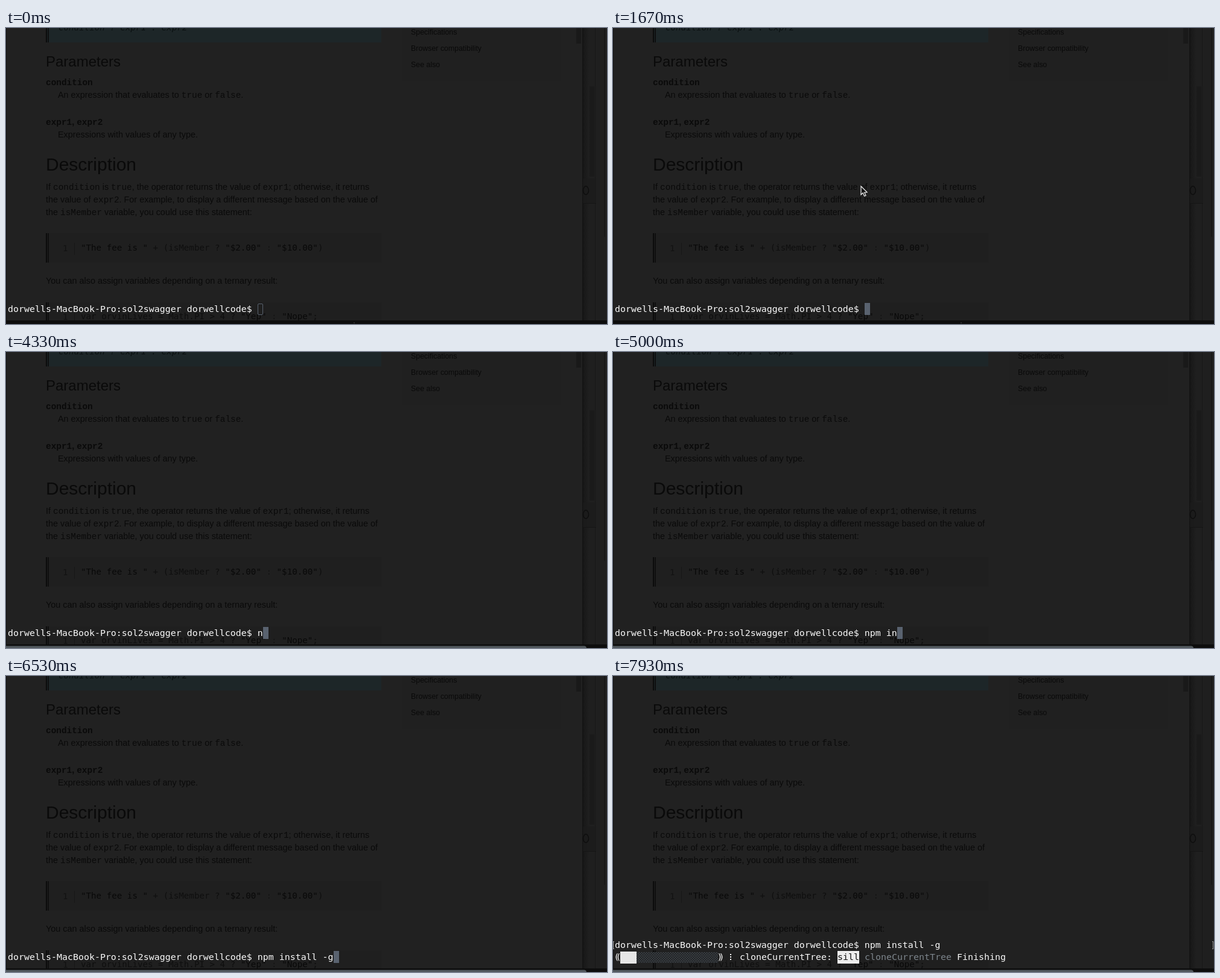
Write an HTML page with a canvas that moves like this. It is 996 px wide and 492 px high and loops after 8 s.

```html
<!DOCTYPE html>
<html lang="en">
<head>
<meta charset="utf-8">
<title>Terminal over a docs page</title>
<style>
  html, body { margin: 0; width: 100%; height: 100%; overflow: hidden; background: #212121; }
  canvas { display: block; }
</style>
</head>
<body>
<canvas id="stage" width="996" height="492"></canvas>
<script>
const W = 996, H = 492, LOOP = 8000, STEP = 200 / 3;
const ctx = document.getElementById('stage').getContext('2d');

const SANS = '"Liberation Sans", Arial, sans-serif';
const COURIER = '"Liberation Mono", "Courier New", monospace';
const MONO = '"DejaVu Sans Mono", Monaco, monospace';
const INK = '#0a0a0a', LIGHT = '#fafafa', CURSOR = '#59626f';
const CELL = 9, LEFT = 3, ROW = 20, LAST = 472;
const PROMPT = 'dorwells-MacBook-Pro:sol2swagger dorwellcode$ ';
const COMMAND = 'npm install -g';
const KEYS = [4330, 4470, 4670, 4730, 4930, 5000, 5070, 5270, 5400, 5530, 5670, 5800, 6270, 6530];
const ENTER = 6800;

function rect(x, y, w, h, color) {
  ctx.fillStyle = color;
  ctx.fillRect(x, y, w, h);
}

function text(str, x, y, font, color = INK) {
  ctx.font = font;
  ctx.fillStyle = color;
  ctx.fillText(str, x, y);
  return x + ctx.measureText(str).width;
}

// Prose with inline code between backticks.
function prose(str, x, y, weight = '') {
  str.split('`').forEach((part, i) => {
    x = text(part, x, y, `${weight} 14.4px ${i % 2 ? COURIER : SANS}`);
  });
}

function codeBox(y, h, fill) {
  rect(66, y, 556, h, fill);
  rect(66, y, 2, h, '#0b0b0b');
  rect(69, y, 2, h, '#0f0f0f');
}

// Code whose quoted strings are darkest and colons faintest.
function codeLine(str, y) {
  text('1', 94, y + 1, `14.2px ${MONO}`, '#121212');
  rect(113, y - 13, 1, 20, '#161616');
  let x = 124;
  str.split(/("[^"]*"|:)/).forEach((part, i) => {
    const color = part === ':' ? '#151515' : i % 2 ? '#090909' : '#0f0f0f';
    x = text(part, x, y, `14.2px ${MONO}`, color);
  });
}

function drawSide() {
  rect(657, 0, 263, 88, '#202020');
  ['Specifications', 'Browser compatibility', 'See also'].forEach((s, i) =>
    text(s, 671, 11 + 27 * i, `12.4px ${SANS}`));

  rect(945, 0, 8, 26, '#191919');
  const shade = ctx.createLinearGradient(955, 0, 966, 0);
  shade.addColorStop(0, '#121212');
  shade.addColorStop(0.3, '#191919');
  shade.addColorStop(1, '#1f1f1f');
  rect(955, 0, 11, 486, shade);
  rect(966, 0, 30, 486, '#1f1f1f');
  rect(967, 97, 8, 150, '#1a1a1a');
  rect(976, 0, 1, 486, '#181818');
  rect(991, 0, 2, 347, '#181818');
  rect(956, 250, 22, 42, 'rgba(28,28,28,.7)');
  rect(956, 291, 22, 1, '#151515');
  ctx.strokeStyle = '#0e0e0e';
  ctx.lineWidth = 1.5;
  ctx.beginPath();
  ctx.ellipse(961, 270, 4.5, 7, 0, 0, 7);
  ctx.stroke();
}

function drawPage() {
  rect(0, 0, W, H, '#212121');
  rect(0, 0, 1, 486, '#0e0e0e');

  codeBox(0, 24, '#1d2628');
  text('condition ? expr1 : expr2', 87, 4, `italic 14.2px ${MONO}`, '#0b1011');

  text('Parameters', 66, 64, `24px ${SANS}`);
  prose('`condition`', 66, 95, 'bold');
  prose('An expression that evaluates to `true` or `false`.', 86, 116);
  prose('`expr1`, `expr2`', 66, 161, 'bold');
  prose('Expressions with values of any type.', 86, 182);

  text('Description', 66, 237, `30px ${SANS}`);
  prose('If `condition` is `true`, the operator returns the value of `expr1`; otherwise, it returns', 66, 269);
  prose('the value of `expr2`. For example, to display a different message based on the value of', 66, 290);
  prose('the `isMember` variable, you could use this statement:', 66, 311);

  codeBox(341, 49, '#1f1f1f');
  codeLine('"The fee is " + (isMember ? "$2.00" : "$10.00")', 370);
  prose('You can also assign variables depending on a ternary result:', 66, 425);
  codeBox(456, 30, '#1f1f1f');
  codeLine('var orvinLives = Math.PI > 4 ? "Yep" : "Nope";', 484);
  drawSide();
}

function drawEdge(t) {
  rect(0, 486, W, 6, '#0d0d0d');
  if (t < 1800) {
    rect(576, 489, 2, 2, '#2a2a2a');
  } else {
    ctx.fillStyle = '#51585d';
    ctx.beginPath();
    ctx.roundRect(-4, 488.5, 966, 8, 4);
    ctx.fill();
  }
}

const colX = col => LEFT + CELL * col;

function term(str, col, y, color = LIGHT) {
  text(str, colX(col), y, `14.95px ${MONO}`, color);
}

function drawCursor(col, solid) {
  const x = colX(col);
  if (solid) return rect(x, 457, CELL, 20, CURSOR);
  ctx.strokeStyle = CURSOR;
  ctx.lineWidth = 1;
  ctx.beginPath();
  ctx.roundRect(x + 0.5, 458.5, CELL - 1, 18, 1.5);
  ctx.stroke();
}

function bracket(x, dir) {
  rect(dir > 0 ? x : x + 1, 441, 1, 13, '#999');
  rect(x, 441, 2, 1, '#999');
  rect(x, 453, 2, 1, '#999');
}

function drawProgress(done, stage, words, dots) {
  const bar = 18, y = LAST;
  rect(colX(1 + done), 459, CELL * (bar - done), 18, '#272a2d');
  ctx.fillStyle = '#555a5f';
  for (let j = 0; j < 9; j++)
    for (let x = colX(1 + done) + j % 2 * 2; x < colX(1 + bar); x += 4)
      ctx.fillRect(x, 459 + j * 2, 1, 1);
  if (done) rect(colX(1), 458, CELL * done, 20, '#e6e6e6');

  for (const shift of [-1.5, 1.5]) {
    text('(', LEFT + shift, y, `14.95px ${MONO}`, LIGHT);
    text(')', colX(bar + 1) + shift, y, `14.95px ${MONO}`, LIGHT);
  }
  dots.forEach(d => rect(194, 462 + 4 * d, 2, 2, LIGHT));

  let col = 23;
  term(stage + ':', col, y);
  col += stage.length + 2;
  rect(colX(col), 457, CELL * 4, 21, '#ededed');
  term('sill', col, y, '#111');
  col += 5;
  term(words[0], col, y, '#7d858c');
  term(words[1], col + words[0].length + 1, y);
}

function drawTerminal(t) {
  const typed = COMMAND.slice(0, KEYS.filter(k => t >= k).length);
  if (t < ENTER) {
    drawCursor(PROMPT.length + typed.length, t >= 1330);
    term(PROMPT + typed, 0, LAST);
    return;
  }
  term(PROMPT + typed, 0, LAST - ROW);
  bracket(0, 1);
  bracket(993, -1);
  if (t < 7670) drawCursor(0, true);
  else if (t < 7930) drawProgress(0, 'loadCurrentTree', ['install', 'loadIdealTree'], t < 7730 ? [0, 1] : [1, 2]);
  else drawProgress(3, 'cloneCurrentTree', ['cloneCurrentTree', 'Finishing'], [0, 1, 2]);
}

// Pointer slides in, rests for a click, then leaves below.
const EXIT = [[338, 219], [339, 214], [343, 203], [350, 187], [372, 205], [410, 262], [450, 340], [482, 415], [505, 470]];

function pointerAt(t) {
  if (t < 870) return null;
  if (t < 1330) {
    const u = Math.min(1, Math.floor((t - 870) / 65) / 4);
    const e = 1 - (1 - u) ** 2;
    return [53 + 285 * e, 36 + 183 * e];
  }
  return EXIT[Math.floor((t - 1330) / STEP + 0.05)] || null;
}

function drawPointer(t) {
  const p = pointerAt(t);
  if (!p) return;
  ctx.save();
  ctx.translate(p[0] + 1, p[1] + 1);
  ctx.beginPath();
  [[0, 0], [0, 14], [3.2, 11], [5.6, 16.5], [8, 15.5], [5.7, 10.3], [10, 10]]
    .forEach(q => ctx.lineTo(...q));
  ctx.closePath();
  ctx.fillStyle = '#111';
  ctx.strokeStyle = '#f4f4f4';
  ctx.lineWidth = 1.2;
  ctx.fill();
  ctx.stroke();
  ctx.restore();
}

const start = performance.now();

function draw() {
  const t = (performance.now() - start) % LOOP;
  drawPage();
  drawEdge(t);
  drawTerminal(t);
  drawPointer(t);
  requestAnimationFrame(draw);
}
draw();
</script>
</body>
</html>
```
